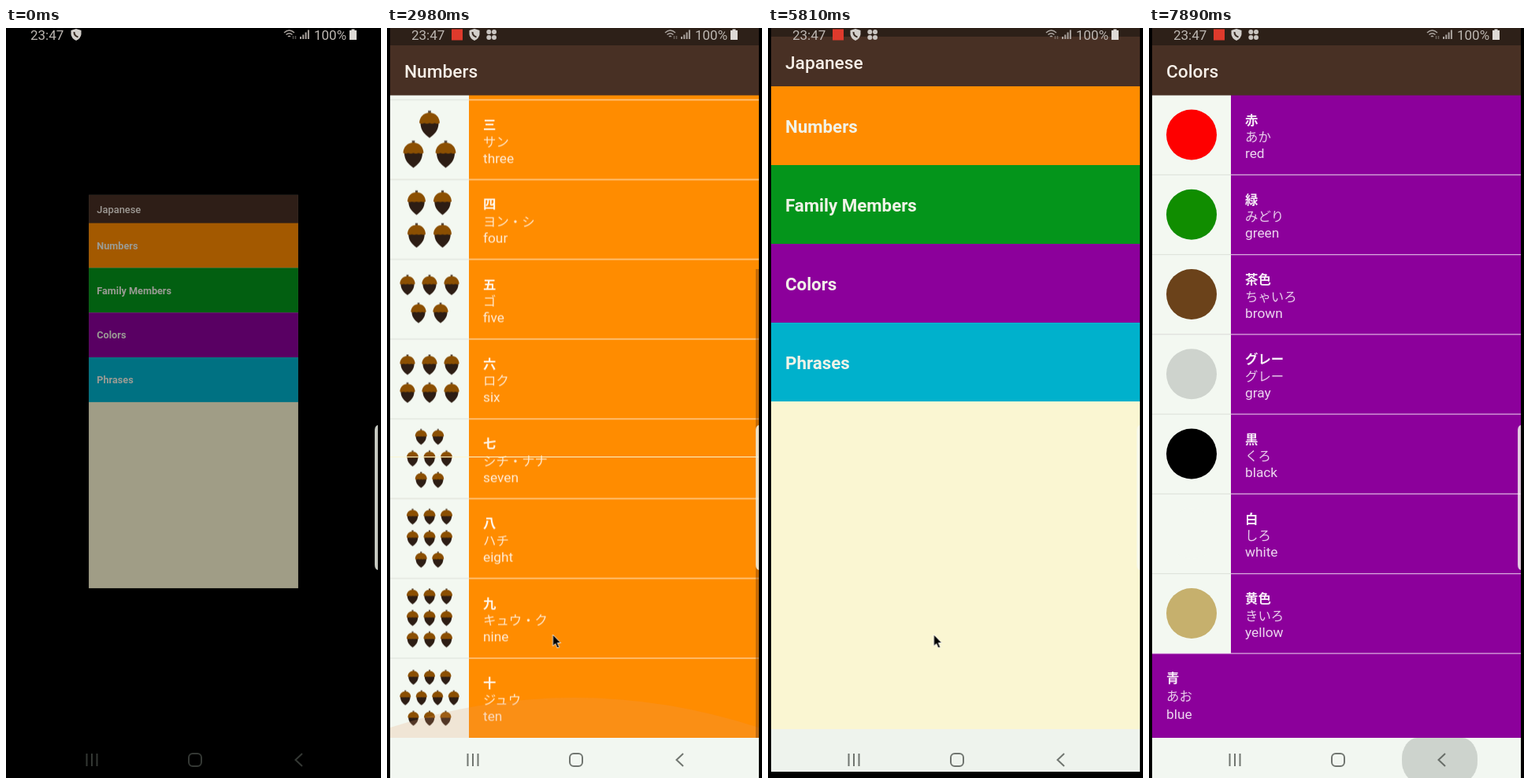
An HTML page that plays this animation: 476x952 px, repeating every 8000 ms.

```html
<!DOCTYPE html>
<html lang="en">
<head>
<meta charset="utf-8">
<title>Vocabulary app</title>
<style>
html, body { margin: 0; width: 100%; height: 100%; overflow: hidden; background: #000; }
svg { display: block; width: 100%; height: 100%; }
text { font-family: Roboto, "Noto Sans CJK JP", "Noto Sans CJK", sans-serif; }
.title { font-size: 22.7px; font-weight: 500; fill: #f6efe8; }
.topic { font-size: 22.3px; font-weight: 700; fill: #f1f3e8; }
.kanji { font-size: 16.4px; font-weight: 700; fill: #fff; fill-opacity: .93; }
.kana { font-size: 16.4px; fill: #fff; fill-opacity: .8; }
.word { font-size: 17.3px; fill: #fff; fill-opacity: .84; }
.kanji, .kana { font-family: "Noto Sans CJK JP", "Noto Sans CJK", sans-serif; }
.status { font-size: 17px; fill: #bdb7b2; }

#main, #open, #chrome, #numbers, #colors, #list, #bar, #glow, #ripple, #cursor, #extra, #shield {
  animation: 8s step-end infinite;
}
#open { transform-origin: 238px 461.5px; animation-name: open; }
#chrome { animation-name: chrome; }
#main { animation-name: main; }
#numbers { animation-name: numbers; }
#colors { animation-name: colors; }
#list { animation-name: list; }
#bar { animation-name: bar; }
#glow { animation-name: glow; }
#ripple { transform-origin: 369px 929px; animation-name: ripple; }
#cursor { animation-name: cursor; }
#extra { animation-name: extra; }
#shield { animation-name: shield; }

@keyframes open {
  0% { transform: scale(.568); opacity: .64; }
  1.75% { transform: scale(.88); opacity: 1; }
  3.625% { transform: scale(.975); }
  5.5%, 100% { transform: scale(1); opacity: 1; }
}
@keyframes chrome { 0% { opacity: 0; } 3.625%, 100% { opacity: 1; } }
@keyframes main {
  0% { transform: translateY(0); }
  18.5% { transform: translateY(-18px); }
  20.375% { transform: translateY(-29px); }
  22.25% { transform: translateY(-31px); }
  69% { transform: translateY(-27px); }
  70.75% { transform: translateY(-19px); }
  72.625% { transform: translateY(-11px); }
  74.5% { transform: translateY(-3px); }
  76.375% { transform: translateY(0); }
  87.5% { transform: translateY(-9px); }
  89.375% { transform: translateY(-26px); }
  91.25%, 100% { transform: translateY(-31px); }
}
@keyframes numbers {
  0% { transform: translateY(96px); opacity: 0; }
  18.5% { transform: translateY(39px); opacity: 1; }
  20.375% { transform: translateY(6px); }
  22.25% { transform: translateY(0); opacity: 1; }
  69% { transform: translateY(14px); opacity: .8; }
  70.75% { transform: translateY(40px); opacity: .3; }
  72.625%, 100% { transform: translateY(96px); opacity: 0; }
}
@keyframes colors {
  0% { transform: translateY(96px); opacity: 0; }
  87.5% { transform: translateY(68px); opacity: 1; }
  89.375% { transform: translateY(16px); }
  91.25% { transform: translateY(2px); }
  93.125%, 100% { transform: translateY(0); opacity: 1; }
}
@keyframes list {
  0% { transform: translateY(0); }
  37.25%, 100% { transform: translateY(-303.5px); }
}
@keyframes bar {
  0% { transform: translateY(0); opacity: 1; }
  24.125% { transform: translateY(0); opacity: 0; }
  37.25% { transform: translateY(221px); opacity: 1; }
  42.875% { transform: translateY(221px); opacity: .5; }
  44.75%, 100% { transform: translateY(221px); opacity: 0; }
}
@keyframes glow {
  0% { opacity: 0; }
  37.25% { opacity: 1; }
  39.125% { opacity: .6; }
  41% { opacity: .3; }
  42.875%, 100% { opacity: 0; }
}
@keyframes ripple {
  0% { transform: scaleX(.7); opacity: 0; }
  65.25% { transform: scaleX(.7); opacity: 1; }
  67.125% { transform: scaleX(1); opacity: .55; }
  69% { transform: scaleX(1); opacity: 0; }
  98.625%, 100% { transform: scaleX(.7); opacity: 1; }
}
@keyframes cursor {
  0% { transform: translate(210.5px, 770px); opacity: 0; }
  5.5% { transform: translate(210.5px, 770px); opacity: 1; }
  80.125% { transform: translate(228px, 778px); }
  82% { transform: translate(254px, 790px); }
  83.875% { transform: translate(272px, 798px); opacity: 1; }
  98.625%, 100% { transform: translate(272px, 798px); opacity: 0; }
}
@keyframes extra { 0% { opacity: 0; } 3.625%, 100% { opacity: 1; } }
@keyframes shield { 0% { transform: translateX(-22px); } 3.625%, 100% { transform: none; } }
</style>
</head>
<body>
<svg viewBox="0 0 476 952">
  <defs>
    <g id="acorn">
      <path d="M-3 -26L-3.5 -32H3.5L3 -26Z" fill="#54453a"/>
      <path d="M-21 -5C-21 14 -11 23 0 31C11 23 21 14 21 -5Z" fill="#2d1d14"/>
      <path d="M-23.5 -3C-23.5 -18 -13 -27.5 0 -27.5S23.5 -18 23.5 -3Q18 -1 12 -3Q6 -1 0 -3Q-6 -1 -12 -3Q-18 -1 -23.5 -3Z" fill="#8b4f02"/>
    </g>
    <clipPath id="view"><path d="M4 85H472V901H4Z"/></clipPath>
  </defs>

  <g id="main">
    <g id="chrome">
      <path d="M4 -5H472V22H4Z" fill="#2d2018"/>
      <path d="M4 901H472V955H4Z" fill="#eef3ed"/>
    </g>
    <g id="open"></g>
  </g>
  <g id="numbers"></g>
  <g id="colors"></g>

  <rect id="ripple" x="300" y="901" width="138" height="56" rx="28" fill="#cdd3cd"/>
  <g fill="none" stroke="#464b46" stroke-opacity=".75" stroke-width="2">
    <path d="M102.5 921V937M109 921V937M115.500 921V937"/>
    <rect x="232" y="921" width="16" height="16" rx="5"/>
    <path d="M376 921L367.500 929L376 937"/>
  </g>
  <path d="M472 504Q468 505 468 511V681Q468 687 472 688Z" fill="#f6faf0" fill-opacity=".8"/>

  <text class="status" x="31" y="15">23:47</text>
  <g id="extra">
    <rect x="82" y="1.500" width="14" height="14" fill="#df3a2c"/>
    <g fill="#c9c4c0">
      <circle cx="129.300" cy="5" r="3"/><circle cx="136" cy="5" r="3"/>
      <circle cx="129.300" cy="12" r="3"/><circle cx="136" cy="12" r="3"/>
    </g>
  </g>
  <g id="shield">
    <path d="M111 1L117.500 3V8Q117 13 111 16Q105 13 104.500 8V3Z" fill="#d3cfcb"/>
    <path d="M108.500 5Q108.500 10 113.500 11.500" fill="none" stroke="#3a2d25" stroke-width="2"/>
  </g>
  <g fill="none" stroke="#aaa39e" stroke-width="1.500">
    <path d="M353 6Q359.500 0 366 6M355.500 8.500Q359.500 5 363.500 8.500M358 11Q359.500 9.500 361 11"/>
    <path d="M364.500 10V14M367.500 10V14" stroke-opacity=".5"/>
    <path d="M374 11V14M377.300 8.500V14M380.600 5.500V14M383.900 2.500V14" stroke-width="2"/>
  </g>
  <text class="status" x="391" y="15">100%</text>
  <path d="M438.500 1.500H442.500V3H445V15H436V3H438.500Z" fill="#dedad6"/>

  <path id="cursor" d="M0 0V14.500L3.300 11.500L5.700 17L8.200 16L5.800 10.500H10Z" fill="#000" stroke="#fff" stroke-width=".8"/>
</svg>
<script>
const ROW = 101.25, PLAIN_ROW = 107;
const $ = id => document.getElementById(id);
const rect = (x, y, w, h, fill) => `<rect x="${x}" y="${y}" width="${w}" height="${h}" fill="${fill}"/>`;
const text = (cls, x, y, s) => `<text class="${cls}" x="${x}" y="${y}">${s}</text>`;
const header = title => rect(4, 22, 468, 63.5, '#483024') + text('title', 22, 62.5, title);

// Rows of acorns, centred in a list picture
function acorns([counts, scale, dx, dy]) {
  return counts.map((n, r) => Array.from({ length: n }, (_, i) => {
    const x = (i - (n - 1) / 2) * dx;
    const y = (r - (counts.length - 1) / 2) * dy;
    return `<use href="#acorn" transform="translate(${x} ${y}) scale(${scale})"/>`;
  }).join('')).join('');
}

const dot = fill => `<circle r="32" fill="${fill}"/>`;

function rows(items, fill) {
  let y = 85, out = '';
  items.forEach(([kanji, kana, word, picture], i) => {
    const h = picture ? ROW : PLAIN_ROW;
    const x = picture ? 122 : 22;
    out += rect(4, y, 468, h + .5, fill);
    if (picture) {
      out += rect(4, y, 100, h + .5, '#f3f8f1') +
        `<g transform="translate(54 ${y + 50.5})">${picture}</g>`;
    }
    if (i) {
      out += rect(4, y - .5, 468, 1.3, 'rgba(255,255,255,.65)');
      if (picture) out += rect(4, y - .5, 100, 1.3, '#dfe4dc');
    }
    out += text('kanji', x, y + 37.5, kanji) +
      text('kana', x, y + (picture ? 59 : 60.5), kana) +
      text('word', x, y + (picture ? 80 : 83.5), word);
    y += h;
  });
  return out;
}

const page = (title, body) =>
  rect(4, -5, 468, 27.5, '#2d2018') + rect(4, 901, 468, 54, '#f2f7f1') +
  `<g clip-path="url(#view)">${body}</g>` + header(title);

const topics = [
  ['Numbers', '#ff8c00'], ['Family Members', '#04951b'],
  ['Colors', '#8c009b'], ['Phrases', '#00b1cc']
];
$('open').innerHTML = rect(4, 85, 468, 816, '#faf6d2') + header('Japanese') +
  topics.map(([name, fill], i) =>
    rect(4, 85 + i * 100, 468, 100, fill) + text('topic', 22, 143.5 + i * 100, name)).join('');

const numbers = [
  ['〇・零', 'ゼロ・レイ', 'zero'],
  ['一', 'イチ', 'one', [[1], 1, 0, 0]],
  ['二', 'ニ', 'two', [[2], .7, 42.5, 0]],
  ['三', 'サン', 'three', [[1, 2], .55, 41, 38]],
  ['四', 'ヨン・シ', 'four', [[2, 2], .49, 33, 41.5]],
  ['五', 'ゴ', 'five', [[3, 2], .41, 28, 35.5]],
  ['六', 'ロク', 'six', [[3, 3], .41, 28, 35.5]],
  ['七', 'シチ・ナナ', 'seven', [[2, 3, 2], .32, 21.5, 27.3]],
  ['八', 'ハチ', 'eight', [[3, 3, 2], .32, 21.5, 27.3]],
  ['九', 'キュウ・ク', 'nine', [[3, 3, 3], .32, 21.5, 27.3]],
  ['十', 'ジュウ', 'ten', [[3, 4, 3], .3, 20.5, 26]]
].map(([a, b, c, layout]) => [a, b, c, layout && acorns(layout)]);

$('numbers').innerHTML = page('Numbers',
  `<g id="list">${rows(numbers, '#ff8c00')}</g>
   <path id="glow" d="M4 888Q238 812 472 888V901H4Z" fill="#e69a6a" fill-opacity=".2"/>
   <rect id="bar" x="468" y="85" width="4" height="595" fill="#6b3a10" fill-opacity=".4"/>`);

const colors = [
  ['赤', 'あか', 'red', '#fe0000'],
  ['緑', 'みどり', 'green', '#108d00'],
  ['茶色', 'ちゃいろ', 'brown', '#6b421a'],
  ['グレー', 'グレー', 'gray', '#ced3cd'],
  ['黒', 'くろ', 'black', '#000'],
  ['白', 'しろ', 'white', '#f3f8f1'],
  ['黄色', 'きいろ', 'yellow', '#c6b06d'],
  ['青', 'あお', 'blue']
].map(([a, b, c, fill]) => [a, b, c, fill && dot(fill)]);

$('colors').innerHTML = page('Colors', rows(colors, '#8c009b'));
</script>
</body>
</html>
```
